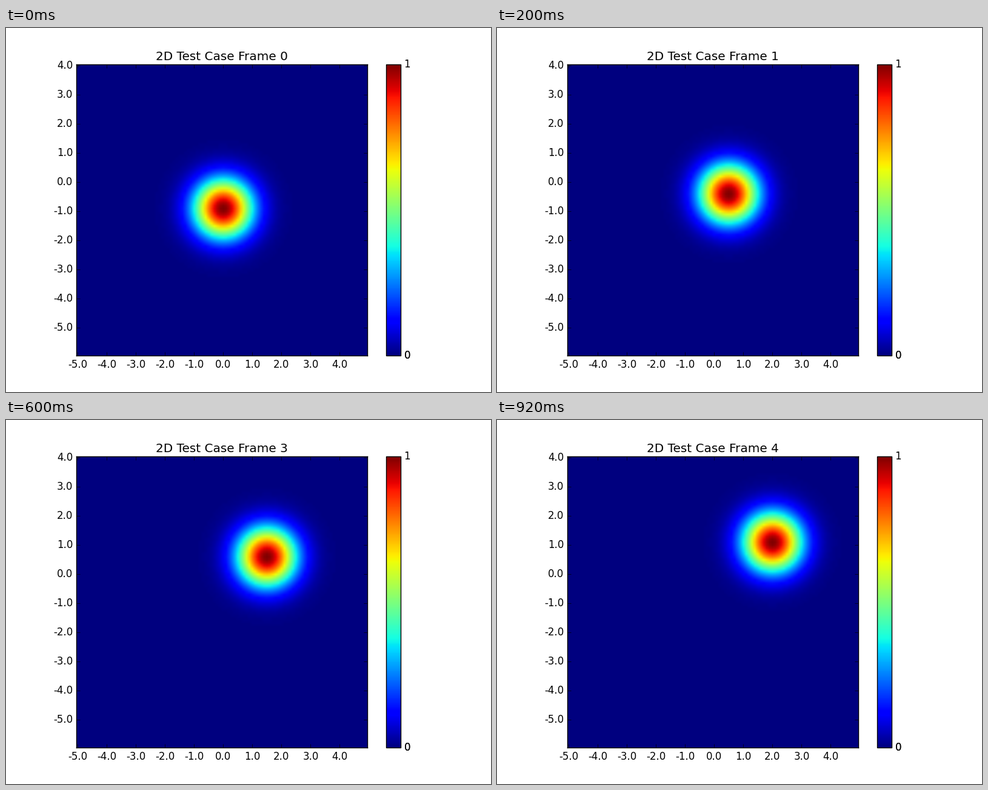
Animation, 800 px wide and 600 px high, one loop 1000 ms. Source, as a matplotlib script:

```python
import numpy as np
import matplotlib.pyplot as plt
from matplotlib.animation import FuncAnimation

FRAMES = 5
INTERVAL = 200
CELLS = 100
STEP = 0.1

plt.style.use("classic")
plt.rcParams.update({
    "font.family": "DejaVu Sans",
    "figure.facecolor": "white",
    "savefig.facecolor": "white",
    "savefig.dpi": "figure",
})

x = -5 + STEP * np.arange(CELLS)
y = 4 - STEP * np.arange(CELLS)
X, Y = np.meshgrid(x, y)


def gaussian(frame):
    """Bump drifting diagonally by half a unit per frame."""
    cx, cy = 0.5 * frame, -0.9 + 0.5 * frame
    return np.exp(-(X - cx) ** 2 - (Y - cy) ** 2)


def title_text(frame):
    return f"2D Test Case Frame {frame}"


fig = plt.figure(figsize=(8, 6), dpi=100)
ax = fig.add_axes([0.145, 0.1, 0.6, 0.8])
cax = fig.add_axes([627 / 800, 0.1, 0.03, 0.8])

image = ax.imshow(gaussian(0), cmap="jet", vmin=0, vmax=1,
                  interpolation="bilinear", interpolation_stage="rgba")
ticks = np.arange(0, CELLS, 10)
ax.set_xticks(ticks, [f"{v:.1f}" for v in x[ticks]])
ax.set_yticks(ticks, [f"{v:.1f}" for v in y[ticks] + 0.0])
title = ax.set_title(title_text(0))

# The lower limit is labelled twice, which darkens its zero.
fig.colorbar(image, cax=cax, ticks=[0, 0, 1], format="%d")


def update(frame):
    image.set_data(gaussian(frame))
    title.set_text(title_text(frame))
    return image, title


anim = FuncAnimation(fig, update, frames=FRAMES, interval=INTERVAL,
                     repeat=True, repeat_delay=0)
plt.show()
```
